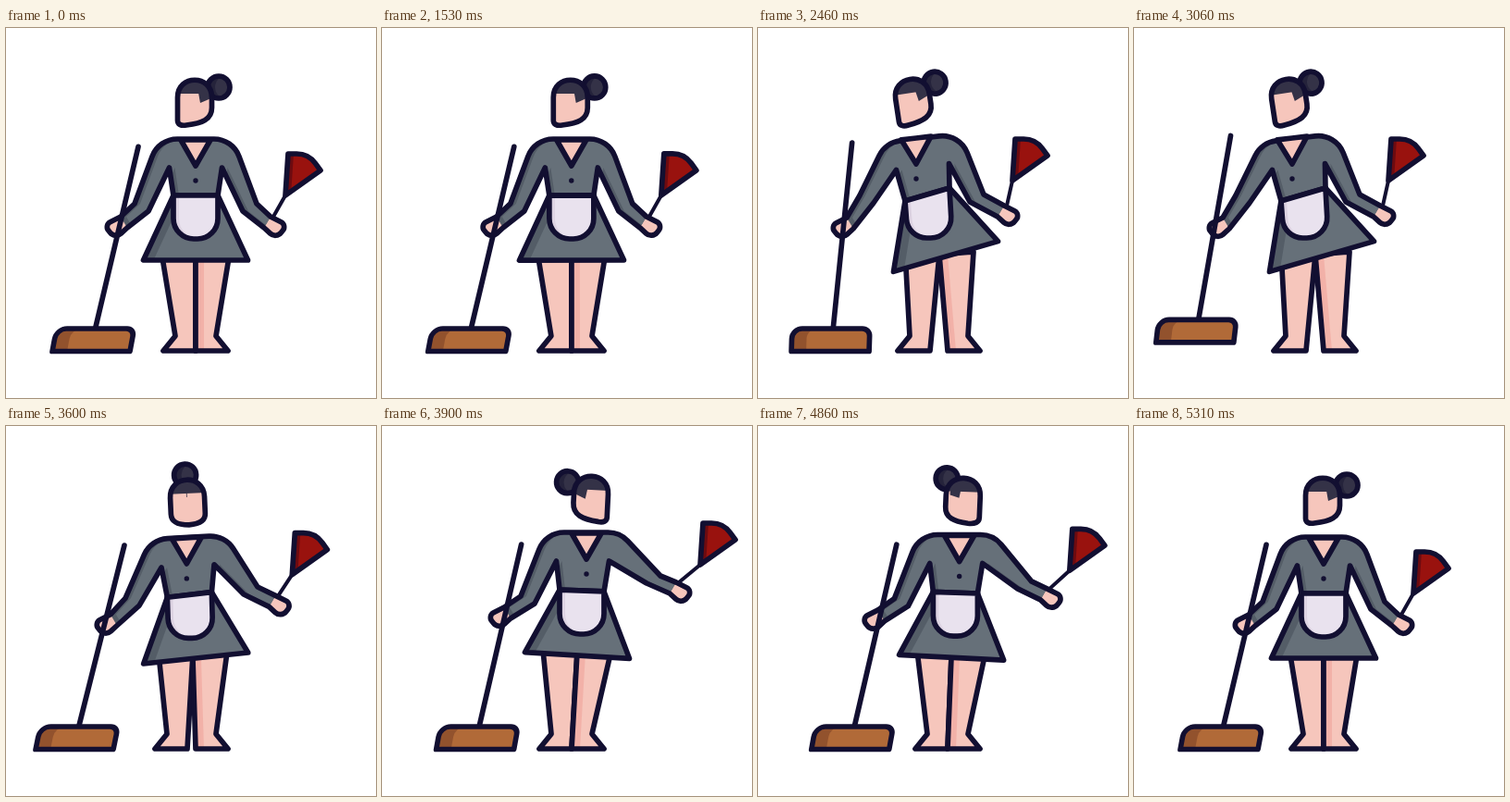
Animation of 400 by 400 pixels, one loop 5370 ms. Source, as an HTML page with a canvas:

```html
<!DOCTYPE html>
<html lang="en">
<head>
<meta charset="utf-8">
<title>Housekeeper</title>
<style>
  html, body { margin: 0; width: 100%; height: 100%; overflow: hidden; background: #fff; }
  canvas { display: block; }
</style>
</head>
<body>
<canvas id="stage" width="400" height="400"></canvas>
<script>
const ctx = document.getElementById("stage").getContext("2d");
const LOOP = 5370, STEP = 30, AXIS = 205;
const INK = "#120f31", SKIN = "#f6c6bc", DRESS = "#667079", DRESS_SHADE = "#545d67", HAIR = "#343247";

// How far each joint moves when leaning left and right: [dx, dy, tilt]
const joints = {
  head:     { left: [-37, -1, -0.15],  right: [22, -2, 0.05] },
  chest:    { left: [-27, -1, -0.12],  right: [12, -5, 0] },
  collar:   { left: [-34, -2, -0.12],  right: [16, -5, 0] },
  waist:    { left: [-22, -1, -0.29],  right: [11, -3, 0.04] },
  apron:    { left: [-19, -1, 0],      right: [11, -3, 0] },
  hem:      { left: [-2, -4, -0.29],   right: [6, -3, 0.06] },
  hip:      { left: [-9, 0, 0],        right: [6, 0, 0] },
  elbowL:   { left: [-29, -9, 0],      right: [11, -6, 0] },
  wristL:   { left: [-28, 1, 0],       right: [8, -8, 0] },
  elbowR:   { left: [-27, -10, 0],     right: [30, -28, 0] },
  wristR:   { left: [-20, -12, 0],     right: [32, -35, 0] },
  duster:   { left: [-27, -16, 0],     right: [42, -31, 0] },
  footL:    { left: [-19, 0, 0],       right: [0, 0, 0] },
  footR:    { left: [0, 0, 0],         right: [0, 0, 0] },
};

// Broom strokes: foot and top of the handle
const broomKeys = [
  { t: 1500, foot: 97, top: 143 },
  { t: 2090, foot: 56, top: 108 },
  { t: 2720, foot: 96, top: 98 },
  { t: 3290, foot: 56, top: 108 },
  { t: 3940, foot: 106, top: 151 },
  { t: 4710, foot: 106, top: 151 },
  { t: 5310, foot: 97, top: 143 },
];

const progress = (t, from, to) => Math.min(1, Math.max(0, (t - from) / (to - from)));
const ease = (t, from, to) => (1 - Math.cos(Math.PI * progress(t, from, to))) / 2;

function poseAt(t) {
  const lean = ease(t, 1500, 2090), cross = ease(t, 3290, 3890), back = ease(t, 4710, 5310);
  const left = lean - cross, right = cross - back;
  const turn = 4 * right * (1 - right);
  const shift = name => {
    const sag = name.startsWith("foot") ? [0, 0, 0] : [-2 * turn, 3.5 * turn, 0];
    return sag.map((s, i) => s + left * joints[name].left[i] + right * joints[name].right[i]);
  };
  // Places a point, given relative to the body axis, on a joint; radius rounds the corner.
  const place = (name, x, y, radius = 0) => {
    const [dx, dy, tilt] = shift(name);
    return [AXIS + x + dx, y + dy + tilt * x, radius];
  };
  return { shift, place, facing: 2 * right - 1 };
}

function draw(time) {
  const t = Math.floor(time % LOOP / STEP) * STEP;
  const pose = poseAt(t), { place } = pose;
  ctx.fillStyle = "#fff";
  ctx.fillRect(0, 0, 400, 400);
  ctx.lineJoin = ctx.lineCap = "round";

  drawLeg(place, -1, "footL");
  drawLeg(place, 1, "footR");
  paint(polygon([
    place("waist", -24, 181), place("hem", -56.5, 251), place("hem", 56.5, 251), place("waist", 24, 181),
  ]), DRESS, DRESS_SHADE, 11);
  outline(line(place("duster", 97, 181), place("wristR", 84, 204)), 4);
  drawTorso(place);
  paint(polygon([
    place("waist", -24, 181), place("waist", 24, 181), place("apron", 24, 228, 22), place("apron", -24, 228, 22),
  ]), "#e9e2ee", "#ddd3e2", 6);
  paint(polygon([
    place("collar", -16, 121), place("collar", 0, 149), place("collar", 16, 121),
  ]), SKIN);
  fill(disc(...place("collar", 0, 165), 2.7), INK);
  drawHead(pose);
  paint(polygon([
    place("duster", 100, 136), place("duster", 122, 136, 25), place("duster", 135, 154), place("duster", 97, 181),
  ]), "#99120e", "#6d0b10", 6);
  drawBroom(t);
}

function drawLeg(place, side, foot) {
  paint(polygon([
    place("hip", 0, 245), place("hip", 37 * side, 242),
    place(foot, 22 * side, 333), place(foot, 35 * side, 349), place(foot, 0, 349),
  ]), SKIN, "#f2b1a8", side > 0 ? 9 : 0);
}

function drawTorso(place) {
  const half = (side, tag, withHand) => [
    place("chest", 40 * side, 120, 29),
    place("elbow" + tag, 66 * side, 190),
    place("wrist" + tag, 81 * side, 204),
    ...(withHand ? [place("wrist" + tag, 99 * side, 213, 6), place("wrist" + tag, 87 * side, 228, 8)] : []),
    place("wrist" + tag, 74 * side, 216),
    place("elbow" + tag, 51 * side, 198),
    place("chest", 28.5 * side, 151),
    place("waist", 24 * side, 181),
  ];
  const body = withHands => polygon([...half(-1, "L", withHands), ...half(1, "R", withHands).reverse()]);
  fill(body(true), SKIN);
  shade(body(false), DRESS, DRESS_SHADE, 6);
  outline(body(true));
}

function drawHead({ shift, facing }) {
  const [dx, dy, tilt] = shift("head");
  ctx.save();
  ctx.translate(204 + dx, 75 + dy);
  ctx.rotate(tilt);
  paint(disc(-26 * facing, -11 - 13 * (1 - facing ** 2), 12), HAIR, "#25233b", 8);

  // The jaw is long on the side she looks towards.
  const jaw = side => {
    const g = side * facing;
    return [[18.5 * side, 18 + 7 * g], [18.5 * side, 26.5 + 2.5 * g], [side * (11.5 + 3.5 * g), 29.5 + 1.5 * g]];
  };
  const [r, r1, r2] = jaw(1), [l, l1, l2] = jaw(-1), chin = [9 * facing, 30];
  const face = new Path2D(`M-18.5 0C-18.5 -25 18.5 -25 18.5 0L${r}C${r1} ${r2} ${chin}C${l2} ${l1} ${l}Z`);
  fill(face, SKIN);
  ctx.save();
  ctx.clip(face);
  ctx.fillStyle = HAIR;
  ctx.fillRect(-20, -25, 40, 21);
  fill(new Path2D(`M${-4 * facing} -5L${-6 * facing} ${6 * facing ** 2}L${-20 * facing} 0V-5Z`), HAIR);
  ctx.restore();
  outline(face);
  ctx.restore();
}

function drawBroom(t) {
  let { foot, top } = broomKeys[0];
  for (let i = 1; i < broomKeys.length; i++) {
    const a = broomKeys[i - 1], b = broomKeys[i], p = ease(t, a.t, b.t);
    foot += (b.foot - a.foot) * p;
    top += (b.top - a.top) * p;
  }
  const footY = 323 - 10 * Math.sin(Math.PI * progress(t, 2720, 3290));
  const tilt = top - foot, skew = (tilt - 15) * 0.006;
  outline(line([top, footY - Math.sqrt(200 ** 2 - tilt ** 2)], [foot, footY]));
  ctx.save();
  ctx.translate(foot, footY);
  ctx.transform(1, 0, -skew, 1, 16 * skew, 0);
  paint(polygon([[-45, 26.5, 0], [-45, 2, 11], [39, 2, 8], [39, 26.5, 0]]), "#b16a38", "#92522d", 16);
  ctx.restore();
}

// Closed polygon of [x, y, corner radius]
function polygon(points) {
  const path = new Path2D(), [x, y] = points[0], [lastX, lastY] = points[points.length - 1];
  path.moveTo((x + lastX) / 2, (y + lastY) / 2);
  points.forEach(([px, py, radius], i) => {
    const [nextX, nextY] = points[(i + 1) % points.length];
    path.arcTo(px, py, nextX, nextY, radius);
  });
  path.closePath();
  return path;
}

function line([x1, y1], [x2, y2]) {
  return new Path2D(`M${x1} ${y1}L${x2} ${y2}`);
}

function disc(x, y, ...radii) {
  const path = new Path2D();
  path.arc(x, y, radii[radii.length - 1], 0, 2 * Math.PI);
  return path;
}

function fill(path, color) {
  ctx.fillStyle = color;
  ctx.fill(path);
}

// Fills a shape, leaving a darker strip along its left edges.
function shade(path, color, dark, width) {
  fill(path, dark);
  ctx.save();
  ctx.clip(path);
  ctx.translate(width, 0);
  fill(path, color);
  ctx.restore();
}

function outline(path, width = 5.7) {
  ctx.strokeStyle = INK;
  ctx.lineWidth = width;
  ctx.stroke(path);
}

function paint(path, color, dark = color, width = 0) {
  shade(path, color, dark, width);
  outline(path);
}

const start = performance.now();
function tick() {
  draw(performance.now() - start);
  requestAnimationFrame(tick);
}
tick();
</script>
</body>
</html>
```
